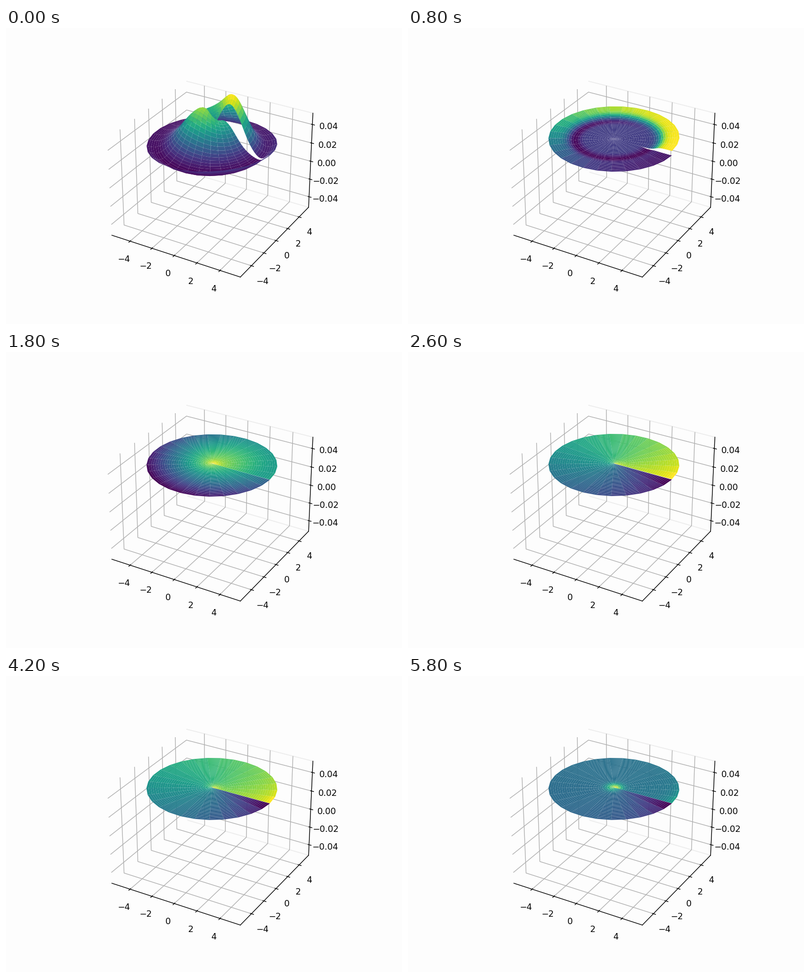
Animation, 800 px wide and 600 px high, one loop 6 s. Source, as a matplotlib script:

```python
import numpy as np
import matplotlib.pyplot as plt
from matplotlib.animation import FuncAnimation

FRAMES, INTERVAL = 30, 200
RADIUS, LEVEL = 5.0, 0.0375
RING, DISC = 4, 9  # steps where the ring and the plain disc are complete
BACK = "#fdfdfd"

R, T = np.meshgrid(np.linspace(0, RADIUS, 30), np.linspace(0, 2 * np.pi, 30))
X, Y = R * np.cos(T), R * np.sin(T)
DEG, S, TURN = np.degrees(T), R / RADIUS, T / (2 * np.pi)


def bell(v, center, width):
    return np.exp(-((v - center) / width) ** 2)


def facing(angle):
    """One at the given direction, zero opposite to it."""
    return np.cos(np.radians(DEG - angle) / 2) ** 4


def hill_shape():
    """Ridge around the centre with two summits, a trough and a raised rim."""
    height = 0.03 + 0.023 * bell(DEG, 30, 65) + 0.0145 * bell(DEG, 255, 55)
    crest = 1 + 0.55 * bell(DEG, 0, 120)
    width = 1.5 + 0.3 * bell(DEG, 180, 90)
    trough = 0.007 + 0.004 * facing(280) * bell(R, 4.2, 0.7)
    lip = 0.009 * facing(320) * bell(R, RADIUS, 0.5)
    return height * bell(R, crest, width) - trough + lip


def ring_shape():
    """Flat inner plate with a rim that climbs around the disc."""
    rim = 0.05 + 0.97 / (1 + np.exp((DEG - 200) / 45))
    outer = 1 / (1 + np.exp((3.6 - R) / 0.2))
    dip = 0.18 * bell(R, 3.0, 0.4) * np.clip((DEG - 50) / 100, 0, 1)
    return 0.2 + (rim - 0.2) * outer - dip


def disc_shape(n):
    """A cone that fades to an angular sweep, then to a central spot."""
    k = max(0, n - DISC) / (FRAMES - 1 - DISC)
    fade = np.exp(-max(0, n - DISC) / 1.5)
    cone = 0.55 * fade * S * (1 - 0.35 * np.cos(np.radians(DEG - 60)))
    sweep = (0.48 - 0.45 * k**2) * (1 - 0.8 * fade) * (1 - 2 * TURN)
    spot = (0.1 + 0.45 * k**4) * bell(R, 0, 0.6) * (1 - 0.6 * TURN)
    corner = (0.2 * k + 0.15 * fade) * np.exp((R - RADIUS) / 0.5 - DEG / 25)
    slit = (0.1 + 0.25 * k - 0.2 * fade) * S * np.exp((DEG - 360) / 30)
    return sweep * (0.6 + 0.4 * S) - cone + spot + corner - slit


HILL, PLATE = hill_shape(), ring_shape() - 0.1


def surface(n):
    if n < RING:
        k = n / RING
        return LEVEL + (1 - k) ** 2 * HILL + 0.005 * k * PLATE
    blend = min(1, (n - RING) / (DISC - RING))
    size = 0.0002 + 0.0048 * np.exp(-0.35 * (n - RING))
    return LEVEL + size * ((1 - blend) * PLATE + blend * disc_shape(n))


def padded(v):
    """Limits with a 5 % margin and the usual 3D view margin."""
    mid, half = (v.max() + v.min()) / 2, np.ptp(v) / 2 * 1.1 * 25 / 24
    return mid - half, mid + half


fig = plt.figure(figsize=(6.4, 4.8), dpi=125, facecolor=BACK)
ax = fig.add_subplot(projection="3d", facecolor=BACK)
ax.set_xlim(*padded(X), view_margin=0)
ax.set_ylim(*padded(Y), view_margin=0)
ax.set_zlim(-0.05, 0.05, view_margin=1 / 48)

# Only the back wall keeps a faint outline.
ax.xaxis.pane.set_visible(False)
ax.zaxis.pane.set_visible(False)
wall = ax.yaxis.pane
wall.set_fill(False)
wall.set_alpha(1)
wall.set_edgecolor("#ececec")


def draw(n):
    for old in list(ax.collections):
        old.remove()
    ax.plot_surface(X, Y, surface(n), cmap="viridis")
    return ax.collections


anim = FuncAnimation(fig, draw, frames=FRAMES, interval=INTERVAL,
                     init_func=lambda: draw(0), repeat=True, blit=False)
plt.show()
```
